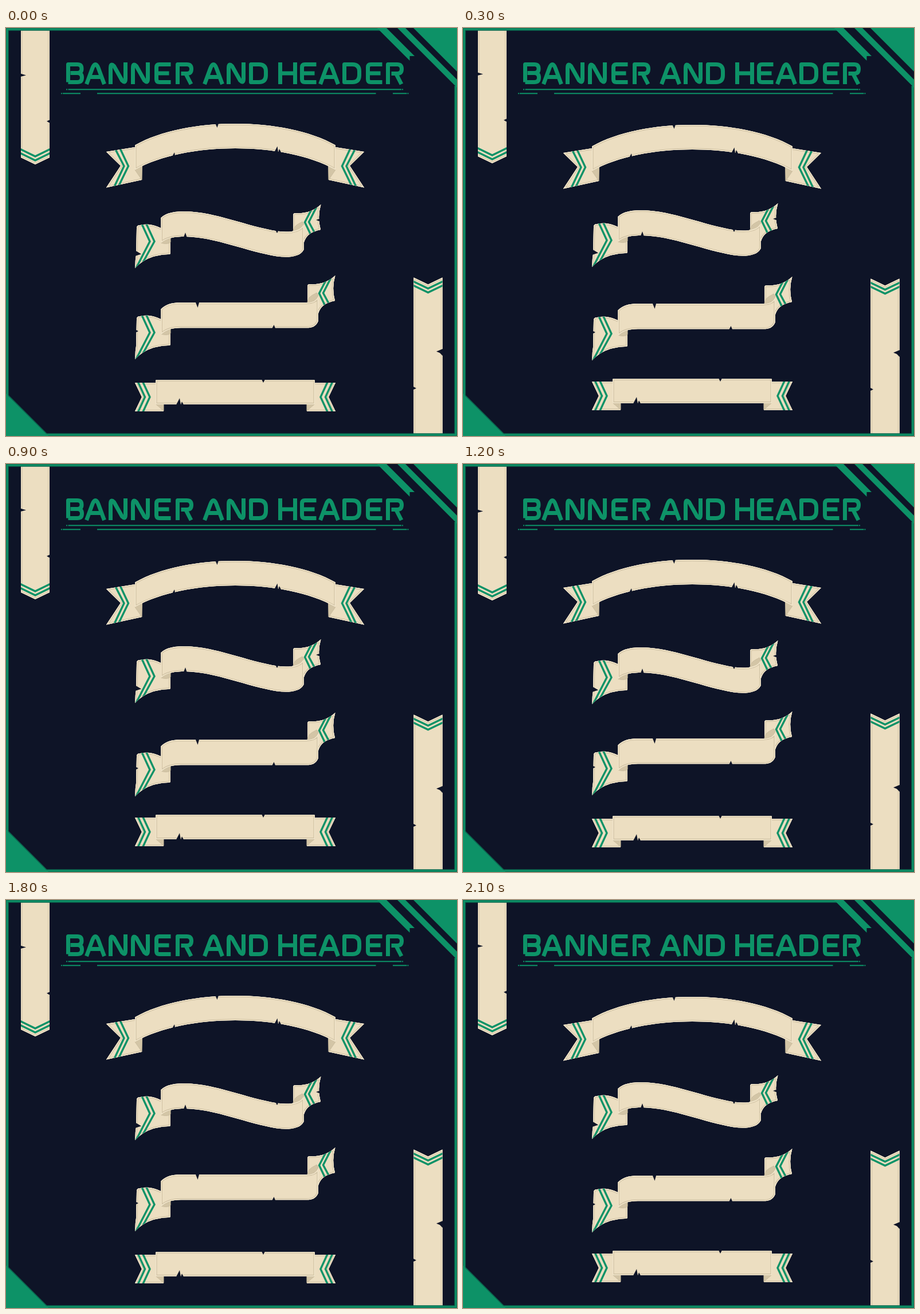
Recreate the animation shown at these times as an HTML page. Size 787 by 712 pixels, loop 2.4 s.

```html
<!DOCTYPE html>
<html lang="en">
<head>
<meta charset="utf-8">
<title>Banner and Header</title>
<style>
  html, body { margin: 0; width: 100%; height: 100%; overflow: hidden; background: #0e1427; }
  svg { display: block; width: 787px; height: 712px; }
  .label { font: 700 52px Inter, sans-serif; fill: none; }
</style>
</head>
<body>
<svg id="stage" viewBox="0 0 787 712"></svg>
<script>
const NS = 'http://www.w3.org/2000/svg';
const NIGHT = '#0e1427', GREEN = '#0d9267', EDGE = '#0b6b51';
const CREAM = '#ecdec1', LINE = '#cbbd9f', SHADE = '#d3c5a6', RIM = '#f4ead2';
const BEAT = 300;
const stage = document.getElementById('stage');
let clips = 0;

function add(parent, tag, attrs) {
  const el = document.createElementNS(NS, tag);
  for (const key in attrs) el.setAttribute(key, attrs[key]);
  return parent.appendChild(el);
}
const fill = (parent, d, color) => add(parent, 'path', { d, fill: color });
const line = (parent, d, color, width, extra) =>
  add(parent, 'path', { d, fill: 'none', stroke: color, 'stroke-width': width, ...extra });

// Cloth panel: light rim, thin inner seam, optional stripes kept inside the edge
function cloth(parent, d, stripes) {
  const id = 'cloth' + clips++;
  add(add(parent, 'clipPath', { id }), 'path', { d });
  const g = add(parent, 'g', { 'clip-path': `url(#${id})` });
  fill(g, d, CREAM);
  line(g, d, LINE, 5);
  line(g, d, CREAM, 3.2);
  line(g, d, RIM, 1.4);
  if (stripes) line(g, stripes, GREEN, 3.4);
}
function fold(parent, d) {
  fill(parent, d, SHADE);
  line(parent, d, LINE, 1);
}
const tears = (parent, d) => fill(parent, d, NIGHT);
const shift = (parent, x, y) => add(parent, 'g', { transform: `translate(${x} ${y})` });
const mirror = parent => add(parent, 'g', { transform: 'translate(800 0) scale(-1 1)' });

// Group that hops by dy on every second beat
function hopper(dy) {
  const g = add(stage, 'g', {});
  g.animate(
    [{ transform: 'translateY(0px)' }, { transform: `translateY(${dy}px)` }],
    { duration: 2 * BEAT, iterations: Infinity, easing: 'steps(2, jump-none)' }
  );
  return g;
}

function hangingRibbons() {
  const left = hopper(-2);
  cloth(left, 'M26-20H76V226L51 238L26 226Z',
    'M24 211L51 224L78 211M24 218L51 231L78 218');
  tears(left, 'M25 79.5L35 82.5L25 85ZM77 160L71 162.8L77 166Z');

  const right = hopper(2);
  cloth(right, 'M711.5 435.5L736.5 447.5L761.5 435.5V730H711.5Z',
    'M709 441.5L736.5 454.5L764 441.5M709 448.5L736.5 461.5L764 448.5');
  tears(right, 'M762 560L751 564.5L757 567L762 572ZM711 626L716 628.7L711 631Z');
}

function archBanner() {
  const g = hopper(2);
  for (const side of [g, mirror(g)]) {
    cloth(side, 'M175 216L237 206V265L175 278.5L200 240.5Z',
      'M190 210L206 241L188 279M198 208L213.5 241L196 277');
    fold(side, 'M225 247.5L237.5 240.5L237 265Z');
  }
  cloth(g, 'M225 204.5C270 179 335 167 400 167S530 179 575 204.5V247.5C530 222 465 210 400 210S270 222 225 247.5Z');
  tears(g, 'M365 166L368.5 174L371 166ZM468 217L473.5 206.5L475 217ZM475 217L477 211L480 217ZM290 224L294 217L295 223Z');
}

// Curled ends shared by the two flowing banners
function leftCurl(g) {
  cloth(g, 'M228 349Q228 344 234 344C247 341 260 344 270 349L287 350V393Q287 395 283 395C262 396 242 401 225.5 419Q225 408 227 396Z',
    'M236 340L251 372.5L227 419M244 340L259 372.5L234 418');
  fold(g, 'M270.5 375C276 369 281 366 287 364V374C283 377 277 377 270.5 375Z');
}
function rightCurl(g) {
  cloth(g, 'M501 327Q501 323 505 323C522 324 536 320 549.5 308Q543 330 549 352C534 355 524 361 520 374L512 355H501Z',
    'M535 313L521.5 339L532 361M543.5 309L528.5 338.5L540 360');
  fold(g, 'M501 355C502 344 511 342 517 338Q520 340 519.5 344C515 352 508 355 501 355Z');
}

function waveBanner() {
  const g = hopper(-2);
  leftCurl(g);
  rightCurl(g);
  cloth(g, 'M270.5 331C280 322 295 320 313 320C365 321 420 346 473 354.5C492 357 513 356 519.5 343V387C513 400 492 401 473 398.5C420 390 365 365 313 364C295 364 280 366 270.5 375Z');
  tears(g, 'M225 388L231 391.5L236 394.5L225 398ZM310 365L313 357L315.5 365ZM470 352L473 358L475.5 353ZM550 332L541 335L549 338Z');
}

function straightBanner() {
  const g = hopper(2);
  leftCurl(shift(g, 0, 159));
  rightCurl(shift(g, 25, 124));
  cloth(g, 'M270.5 490.5C280 481 292 479.3 303 479.3H523C536 479.3 542 476 545 468V511C541 521 534 523.3 525 523.3H305C290 523.3 278 527 270.5 535Z');
  tears(g, 'M225 526L231 529L225 532ZM331 479L334.5 488L337 479ZM464.5 524L467.5 518L470 524Z');
}

function plainBanner() {
  const g = hopper(-2);
  for (const side of [g, mirror(g)]) {
    cloth(side, 'M225 619H275V669H225L237 644Z',
      'M230 617L242.5 644L230 671M238.5 617L251 644L238.5 671');
    fold(side, 'M261.5 656.5H275V668Z');
  }
  cloth(g, 'M261 616Q261 614 263 614H537Q539 614 539 616V656.5H261Z');
  tears(g, 'M446 613L449 619L452 613ZM297 657.5L303 646L305 657.5ZM305 657.5L307 652L310 657.5Z');
}

function heading() {
  const glyphs = {
    A: 'M-1 34.5L9.5 6Q14.5-6 19.5 6L30 34.5M5 22H24',
    B: 'M0 31V0H16Q23.5 0 23.5 7.5T16 15H4M16 15Q24 15 24 23T16 31H0',
    D: 'M0 0H14Q26 0 26 12V19Q26 31 14 31H0Z',
    E: 'M25 0H5Q0 0 0 5V26Q0 31 5 31H25M0 15.5H22',
    H: 'M0-3.5V34.5M26-3.5V34.5M0 15.5H26',
    N: 'M0 34.5V6Q0-3 6 3L20 28Q26 34 26 25V-3.5',
    R: 'M0 34.5V0H16Q24 0 24 8T16 16H6M14 16L23.5 34.5'
  };
  const words = [
    ['BANNER', [105, 138, 179, 218, 259, 296]],
    ['AND', [344, 385, 424]],
    ['HEADER', [475, 513, 546, 587, 628, 663]]
  ];
  const text = add(stage, 'text', { x: 105, y: 98, class: 'label' });
  text.textContent = words.map(w => w[0]).join(' ');
  for (const [word, xs] of words) {
    xs.forEach((x, i) => line(shift(stage, x + 3.5, 63.5), glyphs[word[i]], GREEN, 7,
      { 'stroke-linejoin': 'round' }));
  }
  line(stage, 'M105 107.3H107M108.5 107.3H690M691 107.3H693M96 114.3H98M99 114.3H130M159 114.3H645.5M675 114.3H699.5M700.5 114.3H702.5', GREEN, 2);
}

function frame() {
  line(stage, 'M654 2H2V710H785V101', GREEN, 4);
  line(stage, 'M655 4H4V641L71 708H783V101', EDGE, 1.4);
  line(stage, 'M654 .5H.5V711.5H786.5V101', EDGE, 1);
  fill(stage, 'M0 638L74 712H0Z', GREEN);
  fill(stage, 'M711 0H787V76Z', GREEN);
  fill(stage, 'M683 0H697L787 90V104Z', GREEN);
  fill(stage, 'M648 0H664L713 49H704.5V57L652 4.5Z', GREEN);
}

add(stage, 'rect', { width: 787, height: 712, fill: NIGHT });
hangingRibbons();
archBanner();
waveBanner();
straightBanner();
plainBanner();
heading();
frame();
</script>
</body>
</html>
```
